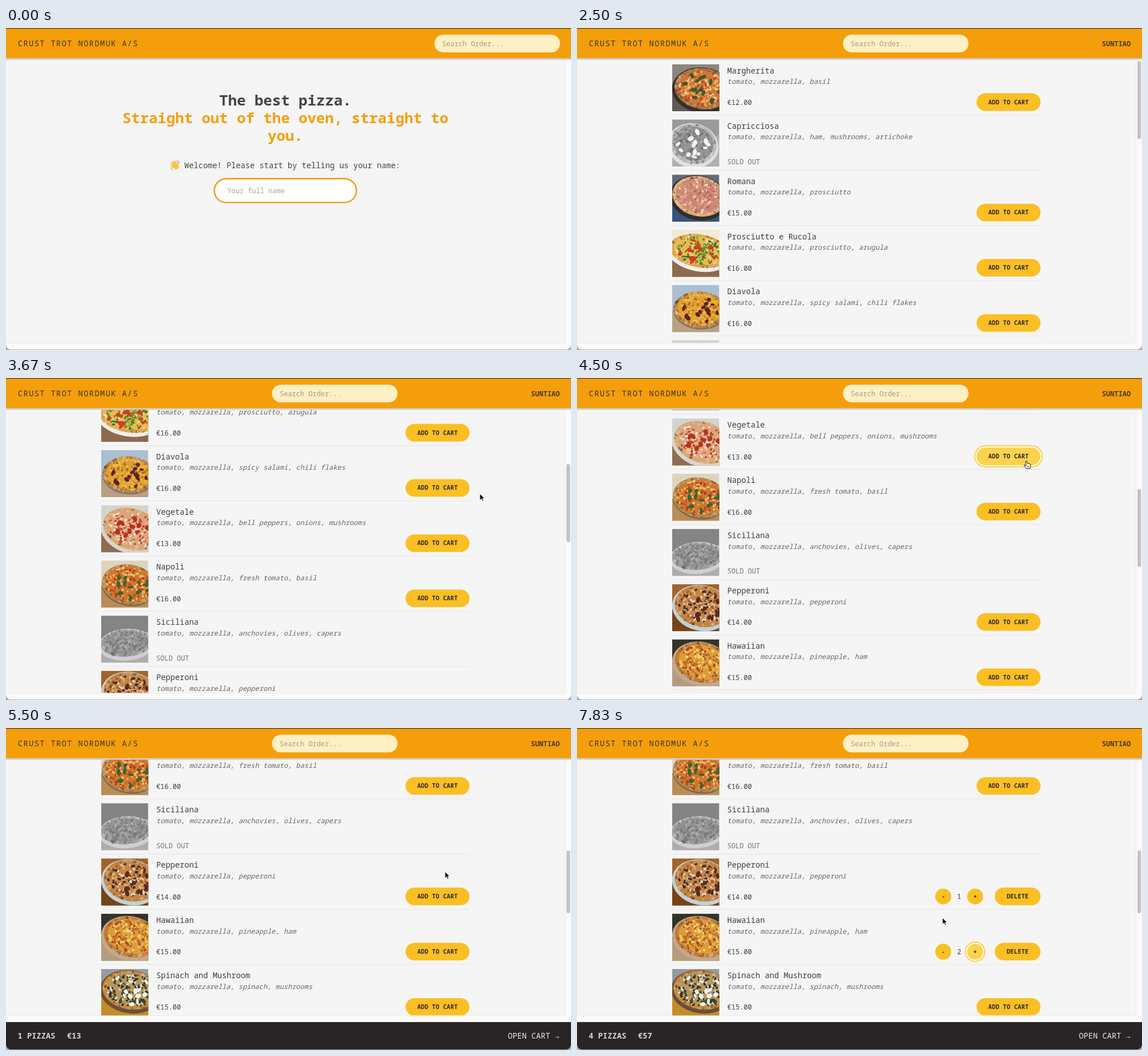
Animation of 991x565 px, one loop 8 s. Source, as an HTML page:

```html
<!DOCTYPE html>
<html lang="en">
<head>
<meta charset="utf-8">
<title>Pizza order</title>
<style>
html, body { margin: 0; width: 100%; height: 100%; overflow: hidden; background: #a9a9a9; }
svg { display: block; }
text { font-family: "Noto Sans Mono", "Liberation Mono", monospace; fill: #444; white-space: pre; }
.soldout { filter: grayscale(1); opacity: .85; }
</style>
</head>
<body>
<svg id="stage" width="991" height="565" viewBox="0 0 991 565"></svg>
<script>
const BRAND = 'CRUST TROT NORDMUK A/S', CUSTOMER = 'Suntiao';
const LOOP = 8000, TICKS_PER_SECOND = 6, LAST_TICK = 47;
const BASE = 13.74, SMALL = 12.03, TINY = 10.31;
const ROW_TOP = 63.5, ROW_STEP = 96.9, PHOTO = 82.5;
const ORANGE = '#f59e0b', YELLOW = '#fbbf24', HOVER = '#fcd34d', INK = '#292524';

// name, ingredients, price (0 = sold out), photo look (at: center, radii, tilt)
const menu = [
  ['Margherita', 'tomato, mozzarella, basil', 12,
    { back: '#8b857b', front: '#5d5a58', plate: '#34302e', crust: '#a87440', base: '#d2743a', bits: ['#f0d090', '#e9a84e', '#b5401f', '#e8bd70'], leaf: '#3d5a30', at: [54, 43, 50, 36, 8] }],
  ['Capricciosa', 'tomato, mozzarella, ham, mushrooms, artichoke', 0,
    { back: '#8a8a8a', front: '#a5a5a5', plate: '#dcdcdc', crust: '#aaa', base: '#808080', bits: ['#6c6c6c', '#a5a5a5', '#5c5c5c', '#888'], leaf: '#f3f3f3', at: [37, 43, 41, 35, 14] }],
  ['Romana', 'tomato, mozzarella, prosciutto', 15,
    { back: '#5f6d78', front: '#35557a', plate: '#352d2a', crust: '#d8ab7a', base: '#c98670', bits: ['#dd9d8c', '#ecd0b2', '#b86456', '#d89580'], at: [47, 38, 47, 35, 12] }],
  ['Prosciutto e Rucola', 'tomato, mozzarella, prosciutto, arugula', 16,
    { back: '#f3ead2', front: '#8c6a50', plate: '#f0eee8', crust: '#dfa550', base: '#edb850', bits: ['#5e8c2c', '#82a840', '#f4dca0', '#47731f'], leaf: '#d43c26', at: [48, 37, 53, 29, 10] }],
  ['Diavola', 'tomato, mozzarella, spicy salami, chili flakes', 16,
    { back: '#a9bfd2', front: '#b8a083', crust: '#b88450', base: '#dca032', bits: ['#f0c148', '#b8641f', '#e8b13c'], leaf: '#5c241e', at: [49, 43, 47, 32, 4] }],
  ['Vegetale', 'tomato, mozzarella, bell peppers, onions, mushrooms', 13,
    { back: '#d2d2cf', front: '#8e6c50', plate: '#d8d5cf', crust: '#d8a874', base: '#dda47c', bits: ['#f4e5d2', '#bd3c25', '#e6bf98', '#b25838'], leaf: '#b8321f', at: [54, 42, 52, 36, 18] }],
  ['Napoli', 'tomato, mozzarella, fresh tomato, basil', 16,
    { back: '#ded4be', front: '#b98d58', crust: '#b88648', base: '#cf772f', bits: ['#b9351b', '#eab653', '#c44d20', '#e9c77c'], leaf: '#3d652c', at: [49, 42, 48, 35, 10] }],
  ['Siciliana', 'tomato, mozzarella, anchovies, olives, capers', 0,
    { back: '#707070', front: '#a0a0a0', plate: '#c8c8c8', crust: '#8c8c8c', base: '#808080', bits: ['#6c6c6c', '#a2a2a2', '#626262', '#949494'], at: [44, 48, 45, 24, -4] }],
  ['Pepperoni', 'tomato, mozzarella, pepperoni', 14,
    { back: '#a3642c', front: '#764417', plate: '#c2d0d6', crust: '#c08440', base: '#c48648', bits: ['#e8d6bb', '#352a27', '#a85830', '#dfb777'], leaf: '#5e2a20', at: [52, 39, 48, 36, 12] }],
  ['Hawaiian', 'tomato, mozzarella, pineapple, ham', 15,
    { back: '#33342b', front: '#b69b80', plate: '#c5a888', crust: '#bf7c3a', base: '#dd9c3a', bits: ['#f4dc78', '#a04a24', '#efc557', '#c0682a'], at: [53, 41, 49, 35, 14] }],
  ['Spinach and Mushroom', 'tomato, mozzarella, spinach, mushrooms', 15,
    { back: '#969ba0', front: '#c58d27', plate: '#67513c', crust: '#c9883a', base: '#b8975c', bits: ['#2c3929', '#3d4a32', '#dcd8cc', '#27302a'], leaf: '#f3f1ec', at: [52, 37, 50, 34, 8] }],
];

// [tick, value...] tables
const scrollKeys = [[16, 0], [19, 150], [22, 324.7], [25, 477], [29, 477], [32, 609.7]];
const pointerKeys = [[17, 850, 230], [22, 831, 203], [24, 831, 203], [26, 788, 145], [29, 788, 145],
  [31, 785, 200], [33, 770, 252], [34, 770, 252], [36, 770, 292], [38, 770, 292],
  [40, 770, 390], [42, 770, 390], [43, 700, 391], [45, 700, 391], [47, 641, 333]];
const clicks = [[27, 5], [37, 8], [41, 9], [44, 9]];
const typedLengths = [[0, 0], [8, 1], [9, 3], [10, 4], [11, 6], [12, 7]];
const MENU_TICK = 14, CART_TICK = 28, POINTER_TICK = 17;

const tween = (keys, k) => {
  const next = keys.findIndex(key => key[0] > k);
  if (next === 0) return keys[0].slice(1);
  if (next < 0) return keys[keys.length - 1].slice(1);
  const a = keys[next - 1], b = keys[next], f = (k - a[0]) / (b[0] - a[0]);
  return a.slice(1).map((v, i) => v + (b[i + 1] - v) * f);
};

const rect = (x, y, w, h, fill, rx = 0, extra = '') =>
  `<rect x="${x}" y="${y}" width="${w}" height="${h}" rx="${rx}" fill="${fill}" ${extra}/>`;
const text = (x, y, str, size = BASE, fill = '#444', extra = '') =>
  `<text x="${x}" y="${y}" font-size="${size}" style="fill:${fill}" ${extra}>${str}</text>`;
const oval = (x, y, rx, ry, fill, extra = '') =>
  `<ellipse cx="${x}" cy="${y}" rx="${rx}" ry="${ry}" fill="${fill}" ${extra}/>`;
const bold = 'font-weight="600"', medium = 'font-weight="500"', middle = 'text-anchor="middle"';

function seeded(seed) {
  return () => (seed = (seed * 16807) % 2147483647) / 2147483647;
}

function photo(y, look, index, soldOut) {
  const rnd = seeded(977 * (index + 3)), [cx, cy, rx, ry, tilt] = look.at;
  const scatter = (count, inner, outer, draw) => Array.from({ length: count }, () => {
    const a = rnd() * 2 * Math.PI, d = Math.sqrt(inner * inner + rnd() * (outer * outer - inner * inner));
    return draw(cx + Math.cos(a) * d * rx, cy + Math.sin(a) * d * ry, Math.floor(rnd() * 180));
  }).join('');
  const blob = (color, size) => (x, y, turn) =>
    oval(x, y, size * (.7 + rnd() * .6), size * (.45 + rnd() * .4), color, `transform="rotate(${turn} ${x} ${y})"`);
  const bit = (x, y, turn) => blob(look.bits[Math.floor(rnd() * look.bits.length)], 2.5)(x, y, turn);
  return `<svg x="167" y="${y}" width="${PHOTO}" height="${PHOTO}"><g class="${soldOut ? 'soldout' : ''}">`
    + rect(0, 0, PHOTO, PHOTO, look.back) + `<path d="M0 44L83 28V83H0Z" fill="${look.front}"/>`
    + `<g transform="rotate(${tilt} ${cx} ${cy})">`
    + (look.plate ? oval(cx, cy + 3, rx + 4, ry + 4, look.plate) : oval(cx, cy + 3, rx, ry, '#0004'))
    + oval(cx, cy, rx, ry, look.crust) + scatter(26, .88, .97, blob('#fff3', 3)) + scatter(16, .88, .97, blob('#4216', 2.4))
    + oval(cx, cy - 1, rx * .87, ry * .85, look.base) + scatter(170, 0, .84, bit)
    + (look.leaf ? scatter(14, 0, .74, blob(look.leaf, 4.6)) : '') + '</g></g></svg>';
}

const rowY = i => ROW_TOP + i * ROW_STEP;
const rows = menu.map(([name, desc, price, look], i) => {
  const y = rowY(i);
  return photo(y, look, i, !price)
    + text(263.5, y + 16.3, name, BASE, '#3f3f3f', medium)
    + text(263.5, y + 34.8, desc, SMALL, '#666', 'font-style="italic"')
    + (price ? text(263.5, y + 71.6, `€${price}.00`, SMALL, '#3f3f3f', medium)
             : text(263.5, y + 78.6, 'SOLD OUT', SMALL, '#747474', medium))
    + rect(167, y + 88.7, 646, 1, '#e6e6e5');
}).join('');

const wave = `<g fill="none" stroke="#f7c644" stroke-width="2.9" stroke-linecap="round">
  <path d="M297 243L290.5 237.5M298 241L292.5 234.8M300 240L296 234.6M295 245L290.3 241.6M301 243L301.5 237.5"/>
  <ellipse cx="298.5" cy="243.3" rx="3.4" ry="3.4" fill="#f7c644"/>
  <path stroke="#9c8c78" stroke-width=".9" d="M299 233.5q3 .7 4 3.6M289 245q.6 3 3.6 4M301 232.6q2.5.6 3.5 3"/></g>`;

const home = text(490, 136, 'The best pizza.', 25.77, '#444', `${bold} ${middle}`)
  + text(490, 167, 'Straight out of the oven, straight to', 25.77, ORANGE, `${bold} ${middle}`)
  + text(490, 198, 'you.', 25.77, ORANGE, `${bold} ${middle}`)
  + wave + text(312.7, 246, 'Welcome! Please start by telling us your name:')
  + rect(365.4, 264.4, 249.2, 41.8, '#fff', 20.9, 'stroke="#f2a024" stroke-width="2.6"')
  + '<g id="field"></g>';

const stage = document.getElementById('stage');
stage.innerHTML = `
  <defs>
    <clipPath id="window">${rect(0, -20, 991, 584.3, '#000', 9)}</clipPath>
    <clipPath id="view"><rect id="viewRect" x="0" y="55" width="980" height="497.5"/></clipPath>
  </defs>
  <g clip-path="url(#window)">
    ${rect(0, 0, 991, 565, '#fafafa')}
    <g clip-path="url(#view)">
      ${rect(0, 50, 981, 515, '#f5f5f5')}
      <g id="home">${home}</g>
      <g id="menu">${rows}<g id="controls"></g></g>
    </g>
    <g id="frame"></g>
    ${rect(0, 53, 991, 2.7, '#cfcfcd')}${rect(0, 0, 991, 53, ORANGE)}${rect(0, 0, 991, 1.2, '#46351f')}
    ${text(20.8, 32.3, BRAND, BASE, '#3f3626', 'letter-spacing="1.374"')}
    <g id="search">${rect(751.5, 11.8, 220.2, 31, '#fef0c5', 15.5)}${text(765, 32, 'Search Order...', SMALL, '#a49b88')}</g>
    <g id="user">${text(920.8, 32, CUSTOMER.toUpperCase(), SMALL, '#46391f', bold)}</g>
  </g>
  <g id="pointer"></g>`;
const el = id => document.getElementById(id);
const show = (id, on) => el(id).setAttribute('display', on ? 'inline' : 'none');

function button(x, y, w, h, label, hovered, focused) {
  const grown = (by, fill) => rect(x - by, y - by, w + 2 * by, h + 2 * by, fill, h / 2 + by);
  const len = label.length * 6.186 + (label.length - 1) * .258;
  return (focused ? grown(4, HOVER) + grown(1.8, '#fff') : '') + grown(0, hovered || focused ? HOVER : YELLOW)
    + text(x + w / 2 - len / 2, y + h / 2 + 3.6, label, TINY, INK, `${bold} letter-spacing=".258"`);
}

function drawControls(k, scroll, pointer, counts) {
  let html = '', overButton = false;
  const add = (x, y, w, h, label, focused) => {
    const [px, py] = pointer, top = y - scroll;
    const hovered = k >= POINTER_TICK && px > x && px < x + w && py > top && py < top + h;
    overButton ||= hovered;
    html += button(x, y, w, h, label, hovered, focused);
  };
  menu.forEach(([, , price], i) => {
    if (!price) return;
    const y = rowY(i), count = counts[i];
    const pressed = clicks.some(([tick, row]) => row === i && tick === k);
    if (!count) return add(700.8, y + 51.1, 112.2, 30.8, 'ADD TO CART', pressed);
    add(628.3, y + 52.7, 28, 28, '-');
    add(684.3, y + 52.7, 28, 28, '+', i === 9 && k >= 44);
    add(732.8, y + 51.1, 80.2, 30.8, 'DELETE');
    html += text(670.3, y + 71.5, count, SMALL, '#3f3f3f', `${medium} ${middle}`);
  });
  el('controls').innerHTML = html;
  return overButton;
}

function drawField(k) {
  const length = typedLengths.filter(([tick]) => tick <= k).pop()[1];
  const caret = length ? true : k >= 2 && k < 5;
  el('field').innerHTML = text(388, 290, length ? CUSTOMER.slice(0, length) : 'Your full name', SMALL, length ? '#444' : '#a3a3a3')
    + (caret ? rect(388 + length * 7.218 - .3, 278, 1, 15.5, '#333') : '')
    + (length ? rect(420.5, 332.5, 139, 44.5, YELLOW, 22.2)
      + text(437.3, 359, 'START ORDERING', SMALL, INK, `${bold} letter-spacing=".3"`) : '');
}

function drawFrame(k, scroll, counts) {
  const cart = k >= CART_TICK, bottom = cart ? 504.5 : 552.5;
  el('viewRect').setAttribute('height', bottom - 55);
  let html = rect(980, 56, 1, bottom - 56, '#e9e9e9') + rect(0, bottom, 981, 1, '#e9e9e9');
  if (k >= MENU_TICK)
    html += rect(983, 58 + scroll * (cart ? .2576 : .2866), 6.5, cart ? 110 : 137, '#c3c3c3', 3.2);
  if (cart) {
    const ids = Object.keys(counts);
    const total = ids.reduce((n, i) => n + counts[i], 0);
    const cost = ids.reduce((n, i) => n + counts[i] * menu[i][2], 0);
    html += rect(0, 516, 991, 49, '#292526')
      + text(20.6, 544.7, `${total} PIZZAS`, BASE, '#d6d3d1', bold)
      + text(107, 544.7, `€${cost}`, BASE, '#d6d3d1', bold)
      + text(880.3, 544.7, 'OPEN CART →', BASE, '#e7e5e4');
  }
  el('frame').innerHTML = html;
}

const ARROW = '<path d="M0 0V11.5L2.7 9L4.6 13.2L6.5 12.4L4.7 8.3H8.3Z" fill="#000" stroke="#fff" stroke-width=".9"/>';
const HAND = '<path d="M-1.2 1.2Q0-.6 1.2 1.2L1.9 5Q3.2 4 4.1 5.3Q5.4 4.7 6 6Q7.6 5.6 7.8 7.4L7.4 11L6.3 14H.2L-3.6 9.2Q-4.3 7.4-2.2 7.8L-.2 9Z" fill="#fff" stroke="#111" stroke-width="1"/><path d="M2.2 9v3M4.3 9v3" stroke="#111" stroke-width=".8"/>';

function render(k) {
  const [scroll] = tween(scrollKeys, k), pointer = tween(pointerKeys, k), onMenu = k >= MENU_TICK;
  const counts = {};
  clicks.forEach(([tick, row]) => { if (tick < k) counts[row] = (counts[row] || 0) + 1; });
  show('home', !onMenu);
  show('menu', onMenu);
  show('user', onMenu);
  show('pointer', k >= POINTER_TICK);
  el('search').setAttribute('transform', `translate(${onMenu ? -285 : 0})`);
  el('menu').setAttribute('transform', `translate(0 ${-scroll})`);
  drawField(k);
  drawFrame(k, scroll, counts);
  const over = drawControls(k, scroll, pointer, counts);
  el('pointer').innerHTML = over ? HAND : ARROW;
  el('pointer').setAttribute('transform', `translate(${pointer})`);
}

const start = performance.now();
let shown = -1;
function loop() {
  const t = (performance.now() - start) % LOOP;
  const k = Math.min(LAST_TICK, Math.floor((t + 4) * TICKS_PER_SECOND / 1000));
  if (k !== shown) render(shown = k);
  requestAnimationFrame(loop);
}
loop();
</script>
</body>
</html>
```
